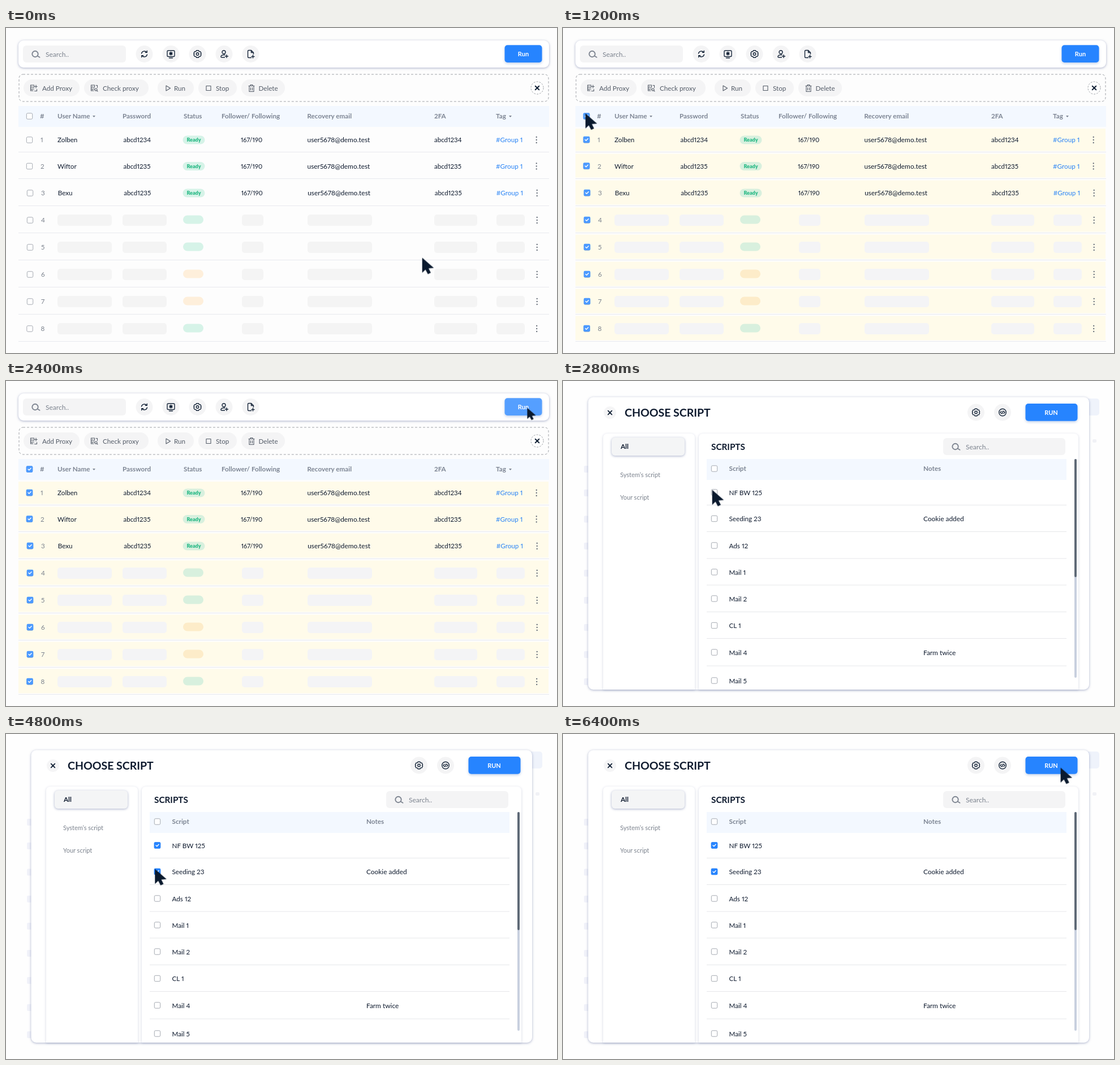
An HTML page for the animation above (6.8 s loop, 974 by 575 pixels).

```html
<!DOCTYPE html>
<html lang="en">
<head>
<meta charset="utf-8">
<title>Run scripts</title>
<style>
html, body { margin: 0; width: 100%; height: 100%; overflow: hidden; background: #fdfdfd; }
svg { display: block; width: 974px; height: 575px; font: 11.7px Lato, "Open Sans", sans-serif; font-variant-numeric: proportional-nums; }
text { fill: #0e1a2e; white-space: pre; }
.b { font-weight: 700; }
.head { font-weight: 700; fill: #7c8492; }
.gray { fill: #7b828d; }
.tool { fill: #545c68; }
.blue { fill: #2a84f5; }
.ready { font-weight: 900; font-size: 9px; fill: #27b985; text-anchor: middle; }
.btn { font-weight: 700; font-size: 11px; fill: #fff; text-anchor: middle; }
.i { fill: none; stroke: #17263a; stroke-width: 1.4; stroke-linecap: round; stroke-linejoin: round; }
.thin { stroke: #545c68; stroke-width: 1.1; }
.find { stroke: #7d8490; stroke-width: 1.9; }
.tick { stroke: #fff; }
.card { fill: #fff; filter: drop-shadow(0 1.5px 2px rgba(92, 106, 155, .52)); }
.panel { fill: #fff; filter: drop-shadow(0 1px 2px rgba(100, 112, 155, .3)); }
.key { fill: #2684ff; filter: drop-shadow(0 2px 2px rgba(60, 110, 190, .32)); }

/* one step is 400 ms = 100% / 17 */
.modal, .sel, .skel, .green, .orange, .go1, .go2, .pick1, .pick2, .cursor {
  animation: 6800ms step-end infinite;
}
.modal { animation-name: modal; }
.sel { animation-name: sel; }
.skel { fill: #f4f4f4; animation-name: skel; }
.green { fill: #d6f3e8; animation-name: green; }
.orange { fill: #feefdb; animation-name: orange; }
.go1 { animation-name: go1; }
.go2 { animation-name: go2; }
.pick1 { animation-name: pick1; }
.pick2 { animation-name: pick2; }
.cursor { fill: #0b1a2e; animation-name: cursor; }
@keyframes modal { 0% { visibility: hidden } 41.17%, 100% { visibility: visible } }
@keyframes sel { 0% { visibility: hidden } 17.64%, 100% { visibility: visible } }
@keyframes skel { 0% { fill: #f4f4f4 } 17.64%, 100% { fill: #f4f4f6 } }
@keyframes green { 0% { fill: #d6f3e8 } 17.64%, 100% { fill: #d8f0de } }
@keyframes orange { 0% { fill: #feefdb } 17.64%, 100% { fill: #fdecc9 } }
@keyframes go1 { 0% { fill: #2684ff } 35.29%, 100% { fill: #559fff } }
@keyframes go2 { 0% { fill: #2684ff } 88.23% { fill: #559fff } 94.11%, 100% { fill: #2684ff } }
@keyframes pick1 { 0% { visibility: hidden } 52.94%, 100% { visibility: visible } }
@keyframes pick2 { 0% { visibility: hidden } 70.58%, 100% { visibility: visible } }
@keyframes cursor {
  0% { transform: translate(735.7px, 406.5px) }
  5.88% { transform: translate(39.2px, 151px) }
  11.76% { transform: translate(38.2px, 150.7px) scale(.74) }
  17.64% { transform: translate(39.7px, 151.2px) }
  23.52% { transform: translate(922px, 47.7px) }
  35.29% { transform: translate(921.4px, 47.6px) scale(.74) }
  41.17% { transform: translate(263.7px, 192.6px) }
  47.05% { transform: translate(262.7px, 192.6px) scale(.74) }
  52.94% { transform: translate(263.7px, 192.6px) }
  58.82% { transform: translate(263.5px, 238.8px) }
  64.7% { transform: translate(262.7px, 238.8px) scale(.74) }
  70.58% { transform: translate(263.3px, 238.8px); opacity: 1 }
  76.47% { transform: translate(263.3px, 238.8px); opacity: 0 }
  82.35% { transform: translate(879.6px, 59.5px); opacity: 1 }
  88.23% { transform: translate(879.6px, 59.5px) scale(.74) }
  94.11%, 100% { transform: translate(879.6px, 59.5px) }
}
</style>
</head>
<body>
<svg id="stage" viewBox="0 0 974 575"></svg>
<script>
const text = (x, y, s, cls = '', size = '') =>
  `<text x="${x}" y="${y}" class="${cls}"${size && ` style="font-size:${size}px"`}>${s}</text>`;
const rect = (x, y, w, h, r, attrs) =>
  `<rect x="${x}" y="${y}" width="${w}" height="${h}" rx="${r}" ${attrs}/>`;
const disc = (x, y, r, fill) => `<circle cx="${x}" cy="${y}" r="${r}" fill="${fill}"/>`;
const line = (x1, x2, y, color) => `<path d="M${x1} ${y}H${x2}" stroke="${color}"/>`;
const ring = (x, y, r) => `M${x - r} ${y}a${r} ${r} 0 1 0 ${2 * r} 0a${r} ${r} 0 1 0 ${-2 * r} 0`;
const many = (list, fn) => list.map(fn).join('');

const cog = 'M-1.8 -6.3H1.8L3 -4.4L5.2 -4.2L6.6 -1.2L5.6 0L6.6 1.2L5.2 4.2L3 4.4L1.8 6.3H-1.8L-3 4.4L-5.2 4.2L-6.6 1.2L-5.6 0L-6.6 -1.2L-5.2 -4.2L-3 -4.4Z';
const server = 'M-5.5 -5.5H.5V-1.5H-5.5ZM-5.5 -1.5V4.5H-1M-5.5 1.5H.5M-3.5 -3.5H-3M-3.5 3H-3';
const icons = {
  find: ring(-1, -.5, 5.2) + 'M3.2 3L7 5.2',
  refresh: 'M-5 -1A5.1 5.1 0 0 1 4 -3M5 1A5.1 5.1 0 0 1 -4 3M4.8 -5.8V-2.8H1.8M-4.8 5.8V2.8H-1.8',
  screen: 'M-5 -6H5Q6.5 -6 6.5 -4.5V3Q6.5 4.5 5 4.5H-5Q-6.5 4.5 -6.5 3V-4.5Q-6.5 -6 -5 -6ZM-3 7H3'
    + ring(0, -.8, 1.8) + 'M0 -3.7V1.9M-2.5 -2.2L2.5 .6M2.5 -2.2L-2.5 .6',
  gear: cog + ring(0, 0, 2.2),
  user: ring(-.5, -3.3, 3) + 'M1 6H-4Q-6 6 -5.5 4Q-4.3 1 1.5 1.5M4.5 1.5V6.5M2 4H7',
  file: 'M1 6.5H-3.5Q-5 6.5 -5 5V-5Q-5 -6.5 -3.5 -6.5H1L5 -2.5V0M1 -6.5V-2.5H5M4 2V7M1.5 4.5H6.5',
  code: ring(0, 0, 6.3) + 'M-2 -2L-4 0L-2 2M2 -2L4 0L2 2M.7 -2.4L-.7 2.4',
  add: server + 'M4 -5.5V-.5M1.8 -3H6.2M1.5 5H5.5V2',
  check: server + ring(3, 2.5, 2) + 'M4.5 4L6 5.5M3 -5H5.5V-1',
  play: 'M-3 -4.5L4.5 0L-3 4.5Z',
  stop: 'M-4 -4H4V4H-4Z',
  trash: 'M-5 -4H5M-4 -4V6H4V-4M-2 -4V-6H2V-4M-1.5 -1V3.5M1.5 -1V3.5',
  close: 'M-3.3 -3.3L3.3 3.3M3.3 -3.3L-3.3 3.3',
  tick: 'M-2.5 0L-.7 1.8L2.6 -1.7'
};
const icon = (name, x, y, cls = '', width = '') =>
  `<path class="i ${cls}" transform="translate(${x} ${y})" d="${icons[name]}"${width && ` style="stroke-width:${width}"`}/>`;
const round = (name, x, y) => disc(x, y, 15, '#f4f4f5') + icon(name, x, y);
const box = (x, y) => rect(x - 5.2, y - 5.2, 10.4, 10.4, 2, 'fill="#fff" stroke="#a4a9b1"');
const checked = (x, y, color) =>
  rect(x - 5.8, y - 5.8, 11.6, 11.6, 2, `fill="${color}"`) + icon('tick', x, y, 'tick');
const search = (x, y, w) => rect(x, y, w, 30, 6, 'fill="#f4f4f5"')
  + icon('find', x + 22.5, y + 15.5, 'find') + text(x + 40, y + 19.5, 'Search..', 'gray', 12);

const users = [
  ['Zolben', 'abcd1234'],
  ['Wiftor', 'abcd1235'],
  ['Bexu', 'abcd1235']
];
const blanks = [[91, 96], [206, 78], [417, 38], [533, 114], [757, 76], [867, 50]];
const rowY = [198, 244.5, 292, 340, 388, 436, 484, 532];
const rowEnd = [219.5, 266.5, 314.5, 362.5, 410.5, 458.5, 506.5, 554.5];

function row(y, i) {
  const dx = i < 2 ? 0 : i < 7 ? 1 : .5;
  const top = i ? rowEnd[i - 1] : 175;
  let s = '<g class="sel">' + rect(22, top + 3, 937, rowEnd[i] - top - 5, 0, 'fill="#fffbea"') + '</g>'
    + line(22, 960, rowEnd[i], '#e8e9ee') + box(41.5 + dx, y)
    + `<g class="sel">${checked(41.5 + dx, y - .5, '#4c9aff')}</g>`
    + text(61 + dx, y + 4, i + 1, 'gray')
    + many([-5, 0, 5], d => disc(937.7 + dx, y + d, 1.15, '#636a75'));
  if (i < 3) {
    const [name, pass] = users[i];
    const d = i === 2 ? .7 : 0;
    s += text(91 + d, y + 4, name) + text(207.5 + d, y + 4, pass, '', 11.5)
      + rect(312.5, y - 7.5, 39, 15, 7.5, 'class="green"') + text(332, y + 3.3, 'Ready', 'ready')
      + text(415 + d, y + 4, '167/190', '', 11) + text(532.5 + d, y + 4, 'user5678@demo.test', '', 11.9)
      + text(757 + d, y + 4, pass, '', 11.5) + text(866 + d, y + 4, '#Group 1', 'blue');
  } else {
    s += many(blanks, ([x, w]) => rect(x, y - 10, w, 20, 5, 'class="skel"'))
      + rect(313, y - 8.5, 36, 15, 7.5, `class="${i === 5 || i === 6 ? 'orange' : 'green'}"`);
  }
  return s;
}

const tools = [
  ['add', 31, 99, 'Add Proxy', 64], ['check', 138, 114, 'Check proxy', 171],
  ['play', 268, 64, 'Run', 297], ['stop', 340, 68, 'Stop', 371], ['trash', 416, 77, 'Delete', 446.5]
];
const heads = [
  [60, '#'], [91, 'User Name'], [206, 'Password'], [314, 'Status'], [381, 'Follower/ Following'],
  [532.5, 'Recovery email'], [757, '2FA'], [866, 'Tag']
];
const list = `<g>
  ${rect(22, 22, 938, 48, 9, 'class="card"')}${search(30, 31, 182)}
  ${many(['refresh', 'screen', 'gear', 'user', 'file'], (n, i) => round(n, 244.5 + 47 * i, 46))}
  ${rect(881.5, 30.3, 66, 30.7, 5, 'class="key go1"')}${text(914.5, 50, 'Run', 'btn')}
  ${rect(23, 82, 936, 48, 7, 'fill="none" stroke="#a0a3a8" stroke-dasharray="4 3"')}
  ${many(tools, ([n, x, w, label, tx]) => rect(x, 91, w, 30, 15, 'fill="#f4f4f5"')
    + icon(n, x + 18, 106.5, 'thin') + text(tx, 110.5, label, 'tool'))}
  <circle cx="939" cy="106" r="11" fill="#fff" stroke="#a0a3a8" stroke-dasharray="3 2"/>
  ${icon('close', 939, 106, '', 2)}
  ${rect(22, 138, 938, 37, 0, 'fill="#f3f8ff"')}
  ${many(heads, ([x, s]) => text(x, 159.7, s, 'head'))}
  <path d="M153 155h5l-2.5 3zM889 155h5l-2.5 3z" fill="#7c8492"/>
  ${box(41.5, 156)}<g class="sel">${checked(41.5, 156, '#4c9aff')}</g>
  ${many(rowY, row)}
</g>`;

const scripts = [
  [197, 'NF BW 125'], [243.5, 'Seeding 23', 'Cookie added'], [291, 'Ads 12'], [338, 'Mail 1'],
  [385, 'Mail 2'], [432.5, 'CL 1'], [480, 'Mail 4', 'Farm twice'], [530, 'Mail 5']
];
const modal = `<g class="modal">
  ${rect(0, 0, 974, 575, 0, 'fill="#fefefe"')}
  ${rect(900, 31, 48, 30, 5, 'fill="#eff3fb"')}${rect(936, 103, 7, 6, 2, 'fill="#f1f2f6"')}
  ${many([156, ...rowY], y => rect(37, y - 6, 12, 12, 2, 'fill="#f1f2f9"'))}
  ${rect(44.5, 28.5, 885.5, 517.5, 9, 'class="card"')}
  ${disc(83, 56, 11, '#f5f5f6')}${icon('close', 83, 56, '', 1.9)}
  ${text(109, 62.7, 'CHOOSE SCRIPT', 'b', 19.5)}
  ${round('gear', 730, 55.5)}${round('code', 777, 55.5)}
  ${rect(817.5, 40, 92, 30.8, 5, 'class="key go2"')}${text(863, 59.5, 'RUN', 'btn')}
  <path class="panel" d="M71 546V101Q71 93 79 93H225Q233 93 233 101V546Z"/>
  <path class="panel" d="M240 546V101Q240 93 248 93H903Q911 93 911 101V546Z"/>
  ${rect(86, 100, 129, 32, 6, 'class="card" style="fill:#f4f5f6"')}
  ${text(102, 119.7, 'All', 'b')}${text(101, 170, 'System’s script', 'gray', 11)}${text(101, 210.3, 'Your script', 'gray', 11)}
  ${text(262, 122, 'SCRIPTS', 'b', 15.3)}${search(672, 101, 216)}
  ${rect(254, 138, 636, 37, 0, 'fill="#f3f8ff"')}
  ${box(267.5, 155)}${text(293.5, 159.2, 'Script', 'head')}${text(637, 159.2, 'Notes', 'head')}
  ${many([219.5, 266.5, 314, 361, 408.5, 455.5, 504], y => line(254, 890, y, '#e6e7ea'))}
  ${many(scripts, ([y, name, note = '']) => box(267.5, y) + text(293.5, y + 4.6, name) + text(637, y + 4.6, note, '', 11.9))}
  <g class="pick1">${checked(267.5, 197, '#2684ff')}</g>
  <g class="pick2">${checked(267.5, 243.5, '#2684ff')}</g>
  ${rect(904, 138, 4, 387, 2, 'fill="#c8d0df"')}${rect(904, 138, 4, 209, 2, 'fill="#5f6a77"')}
</g>`;

document.getElementById('stage').innerHTML = list + modal
  + '<path class="cursor" d="M0 0V26.5L5.8 21L10 29L15.2 26.6L11.3 18.8L20.5 18Z"/>';
</script>
</body>
</html>
```
